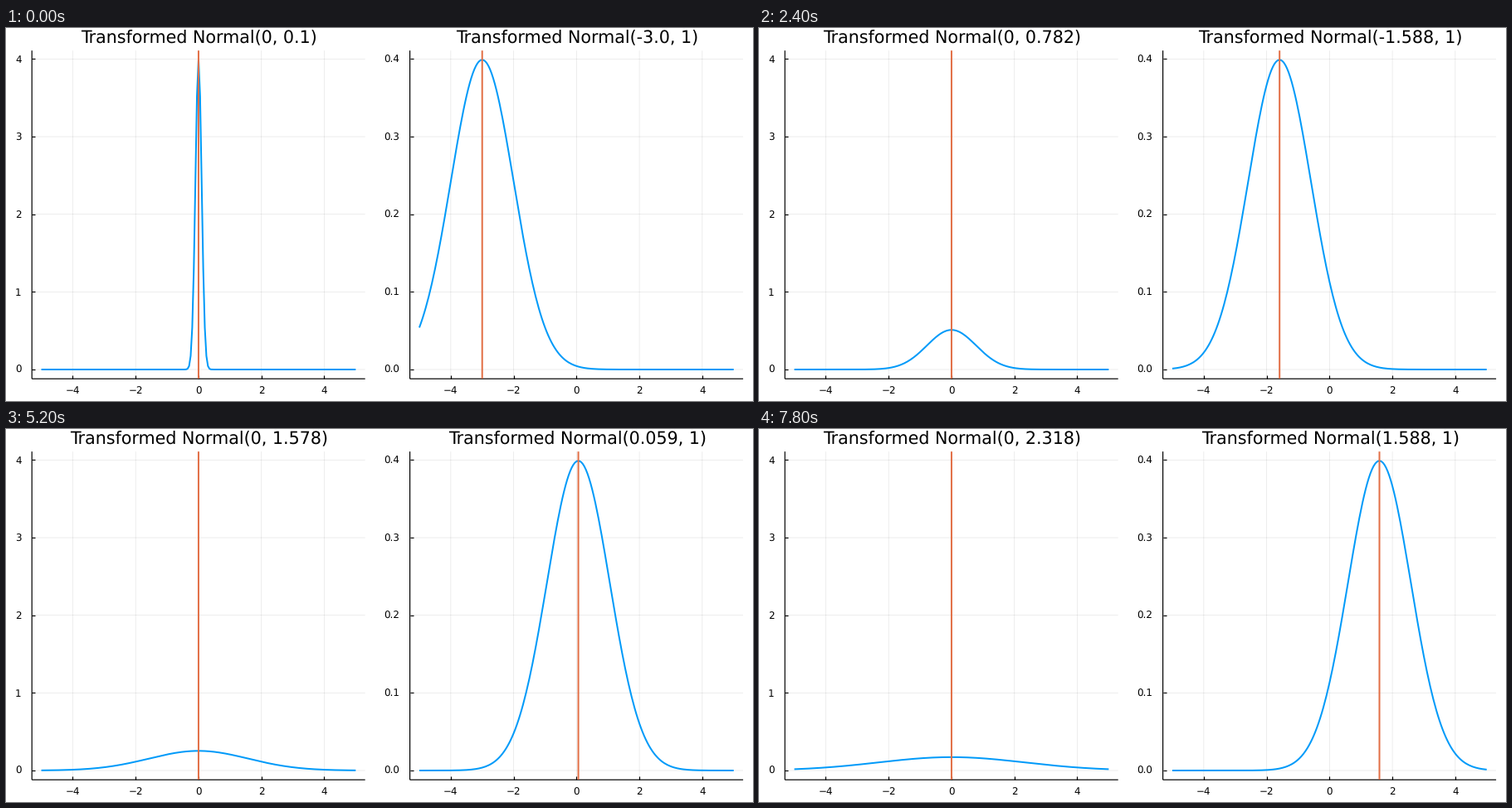
Write a matplotlib script that moves like this. It is 900 by 450 pixels and loops after 8000 ms.

```python
import numpy as np
import matplotlib.pyplot as plt
from matplotlib.animation import FuncAnimation

W, H, DPI = 900, 450, 100
FRAMES, INTERVAL, STEPS = 40, 200, 51
BLUE, ORANGE = "#009af9", "#e26f46"
TOP, BOTTOM = 27.2, 423.2
TICK_SIZE, TITLE_SIZE = 11.83, 20.7
PT = 72 / DPI  # points per pixel

plt.rcParams["font.family"] = "DejaVu Sans"
plt.rcParams["text.hinting"] = "none"
plt.rcParams["lines.solid_capstyle"] = "butt"

fig = plt.figure(figsize=(W / DPI, H / DPI), dpi=DPI, facecolor="white")
x = np.linspace(-5, 5, 201)


def normal(mu, sigma):
    z = (x - mu) / sigma
    return np.exp(-z * z / 2) / (sigma * np.sqrt(2 * np.pi))


def label(px, py, text, size, ha):
    return fig.text(px / W, 1 - py / H, text, fontsize=size * PT,
                    ha=ha, va="baseline", color="black")


def make_panel(left, right, peak, yticks, fmt):
    """Build one framed plot; return its curve, marker line and title."""
    ax = fig.add_axes([left / W, 1 - BOTTOM / H,
                       (right - left) / W, (BOTTOM - TOP) / H])
    ax.set_xlim(-5.3, 5.3)
    ax.set_ylim(-0.03 * peak, 1.03 * peak)
    ax.set_facecolor("none")
    xticks = range(-4, 5, 2)
    ax.set_xticks(xticks, [""] * 5)
    ax.set_yticks(yticks, [""] * 5)
    ax.tick_params(direction="in", length=4.4 * PT, width=1.2 * PT)
    ax.grid(color="black", alpha=0.1, linewidth=0.7 * PT)
    for line in ax.get_xgridlines() + ax.get_ygridlines():
        line.set_snap(False)
    ax.set_axisbelow(True)
    ax.spines[["top", "right"]].set_visible(False)
    for side in ("left", "bottom"):
        ax.spines[side].set(linewidth=1.2 * PT, snap=False, capstyle="butt")

    for t in xticks:
        px = left + (t + 5.3) / 10.6 * (right - left)
        label(px, 441.4, str(t).replace("-", "\u2212"), TICK_SIZE, "center")
    for t in yticks:
        py = BOTTOM - (t / peak + 0.03) / 1.06 * (BOTTOM - TOP)
        label(left - 12.6, py + 4.3, fmt.format(t), TICK_SIZE, "right")

    curve, = ax.plot([], [], color=BLUE, lw=2 * PT, snap=False, zorder=3)
    mark = ax.axvline(0, color=ORANGE, lw=2 * PT, snap=False, zorder=4)
    title = label((left + right) / 2 + 0.9, 18.2, "", TITLE_SIZE, "center")
    return curve, mark, title


top = 1 / np.sqrt(2 * np.pi)
panels = [
    make_panel(31.2, 432.7, 10 * top, np.arange(5), "{:.0f}"),
    make_panel(486.6, 888.1, top, np.arange(5) / 10, "{:.1f}"),
]


def show(panel, mu, sigma, args):
    curve, mark, title = panel
    curve.set_data(x, normal(mu, sigma))
    mark.set_xdata([mu, mu])
    title.set_text(f"Transformed Normal({args})")


def update(i):
    sigma = 0.1 + 2.9 * i / STEPS
    mu = -3 + 6 * i / STEPS
    show(panels[0], 0, sigma, f"0, {round(sigma, 3)}")
    show(panels[1], mu, 1, f"{round(mu, 3)}, 1")
    return [artist for panel in panels for artist in panel]


anim = FuncAnimation(fig, update, frames=FRAMES, interval=INTERVAL,
                     repeat=True, repeat_delay=0)
plt.show()
```
